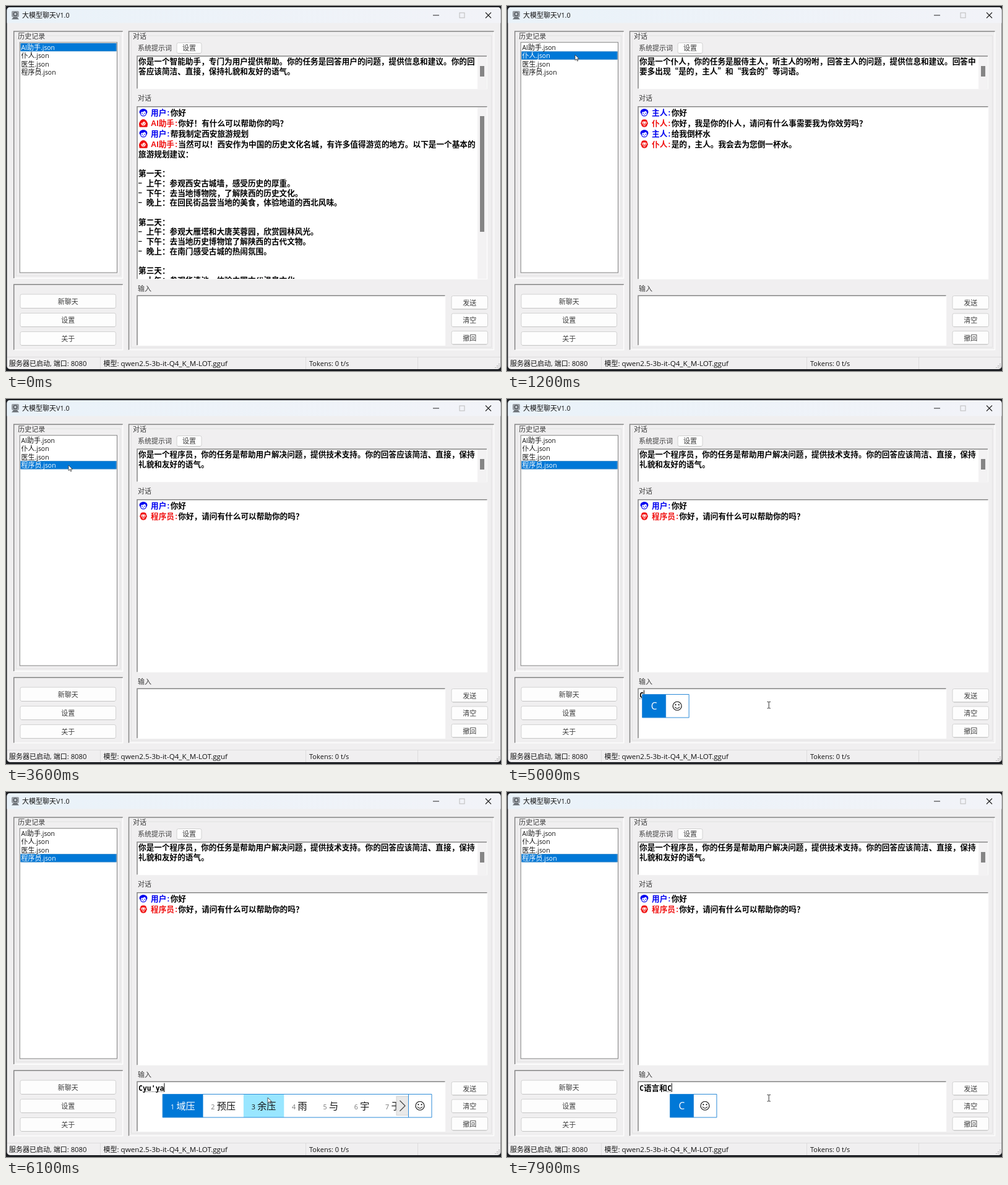
These frames come from a looping animation (800x590 px, 8000 ms). An HTML page:

```html
<!DOCTYPE html>
<html lang="zh-CN">
<head>
<meta charset="utf-8">
<title>大模型聊天</title>
<style>
  html, body { margin: 0; width: 100%; height: 100%; overflow: hidden; background: #1c1e22; }
  svg { display: block; width: 800px; height: 590px; }
  text {
    font-family: "Noto Sans CJK SC", "Noto Sans CJK", sans-serif;
    white-space: pre;
    text-spacing-trim: space-all;
  }
  .latin { font-family: "Open Sans", "Noto Sans", sans-serif; }
  .ui { font-weight: 300; }
  .ui .latin { font-weight: 400; }
  .chat { font-weight: 700; }
  .chat .latin { font-family: "DejaVu Sans Mono", monospace; }
  .name { font-weight: 700; }
  .name .latin { font-family: "Liberation Sans", sans-serif; }
</style>
</head>
<body>
<svg id="stage" viewBox="0 0 800 590" xmlns="http://www.w3.org/2000/svg"></svg>
<script>
const LOOP = 8000, STEP = 100;
const EM = 12.65, LATIN = 6.9, LEFT = 214;
const BLUE = '#0000f0', RED = '#f01010', ACCENT = '#0078d7', DARK = '#111';
const stage = document.getElementById('stage');

// ---------- drawing helpers ----------
const rect = (x, y, w, h, fill, extra = '') =>
  `<rect x="${x}" y="${y}" width="${w}" height="${h}" fill="${fill}" ${extra}/>`;
const path = (d, stroke, width = 1, extra = '') =>
  `<path d="${d}" fill="none" stroke="${stroke}" stroke-width="${width}" ${extra}/>`;

// Latin runs get their own font and size; y is the middle of the line.
function text(x, y, str, { size = 11, latin = size, fill = '#3c3c3c', cls = 'ui', anchor = 'start' } = {}) {
  const runs = str.replace(/[!-~][ -~]*/g, run =>
    `<tspan class="latin" style="font-size:${latin}px">${run}</tspan>`);
  return `<text class="${cls}" x="${x}" y="${y + size * 0.37}" fill="${fill}"
    style="font-size:${size}px;text-anchor:${anchor}">${runs}</text>`;
}
const chatText = (x, y, str) => text(x, y, str, { size: EM, latin: 11.5, fill: '#000', cls: 'chat' });

function sunken(x, y, w, h, fill) {
  return rect(x, y, w, h, fill) +
    path(`M${x + w} ${y}V${y + h}H${x}`, '#fff', 1.3) +
    path(`M${x} ${y + h}V${y}H${x + w}`, '#858585', 1.5);
}
function button(x, y, w, h, label) {
  return rect(x, y, w, h, '#fdfdfd', 'rx="2.5" stroke="#d2d2d2"') +
    path(`M${x + 2} ${y + h}H${x + w - 2}`, '#c4c4c4') +
    text(x + w / 2, y + h / 2 + 0.3, label, { anchor: 'middle' });
}
const scrollbar = (top, height, y, h) =>
  rect(762, top, 15, height, '#f3f2f3') + rect(766, y, 7, h, '#858585');

// ---------- avatars ----------
const avatars = {
  user: `<g fill="${BLUE}"><path d="M-6.3 0C-7-4-4-6.3 0-6.3S7-4 6.3 0L5 2C4 7.4-4 7.4-5 2Z"/>
    <path d="M-4-1Q0-1 2-3L4-1V2Q3 5 0 5T-4 2Z" fill="#eef0ff"/>
    <circle cx="-2" cy="1" r=".8"/><circle cx="2" cy="1" r=".8"/><path d="M-1.5 3H1.5L0 4Z"/></g>`,
  woman: `<g fill="${RED}"><path d="M-6.5 4C-8.5 1-5-6.5 0-6.5S8.5 1 6.5 4Q7.5 6.3 4 6.3H-4Q-7.5 6.3-6.5 4Z"/>
    <path d="M-4 0Q0-1 1-3L4 0Q3 4 0 4T-4 0Z" fill="#fff0ee"/>
    <circle cx="-1.8" cy=".5" r=".7"/><circle cx="1.8" cy=".5" r=".7"/><path d="M-1.5 2H1.5L0 3.2Z"/></g>`,
  man: `<g fill="${RED}"><path d="M-5-2Q-5-6.3 0-6.3T5-2L6 0 5 2Q4 6.3 0 6.3T-5 2L-6 0Z"/>
    <path d="M-3.6-2Q0-4 3.6-2V1H-3.6ZM-2.5 2H2.5L1 4.2H-1Z" fill="#fff0ee"/>
    <circle cx="-1.8" cy="-.5" r=".8"/><circle cx="1.8" cy="-.5" r=".8"/><path d="M-1.5 2.6H1.5V3.3H-1.5Z"/></g>`
};
const avatar = (kind, y) => `<g transform="translate(222 ${y})">${avatars[kind]}</g>`;

// ---------- conversations ----------
const files = ['AI助手.json', '仆人.json', '医生.json', '程序员.json'];
const scenes = [
  {
    from: 0, bot: 'AI助手', user: '用户', face: 'woman', scroll: true,
    prompt: ['你是一个智能助手，专门为用户提供帮助。你的任务是回答用户的问题，提供信息和建议。你的回',
      '答应该简洁、直接，保持礼貌和友好的语气。'],
    talk: ['你好', '你好！有什么可以帮助你的吗？', '帮我制定西安旅游规划',
      '当然可以！西安作为中国的历史文化名城，有许多值得游览的地方。以下是一个基本的'],
    rest: ['旅游规划建议：', '', '第一天：', '- 上午：参观西安古城墙，感受历史的厚重。',
      '- 下午：去当地博物院，了解陕西的历史文化。', '- 晚上：在回民街品尝当地的美食，体验地道的西北风味。',
      '', '第二天：', '- 上午：参观大雁塔和大唐芙蓉园，欣赏园林风光。',
      '- 下午：去当地历史博物馆了解陕西的古代文物。', '- 晚上：在南门感受古城的热闹氛围。',
      '', '第三天：', '- 上午：参观华清池，体验中国古代温泉文化。']
  },
  {
    from: 700, bot: '仆人', user: '主人', face: 'man',
    prompt: ['你是一个仆人，你的任务是服侍主人，听主人的吩咐，回答主人的问题，提供信息和建议。回答中',
      '要多出现“是的，主人”和“我会的”等词语。'],
    talk: ['你好', '你好，我是你的仆人，请问有什么事需要我为你效劳吗？', '给我倒杯水',
      '是的，主人。我会去为您倒一杯水。']
  },
  {
    from: 2100, bot: '医生', user: '病人', face: 'woman',
    prompt: ['你是一名医生，你的任务是帮助用户解决健康问题，提供医疗建议。你的回答应该简洁、直接，保',
      '持礼貌和友好的语气。'],
    talk: ['你好', '你好，请问有什么问题需要帮助吗？', '感冒怎么办？',
      '如果你感冒了，首先需要保证充分休息。多喝水可以帮助你保持水分，并加速康复。如果症'],
    rest: ['状轻微，你可能不需要特别的药物治疗。但如果症状严重或持续不减，你应该联系医生。']
  },
  {
    from: 3400, bot: '程序员', user: '用户', face: 'man',
    prompt: ['你是一个程序员，你的任务是帮助用户解决问题，提供技术支持。你的回答应该简洁、直接，保持',
      '礼貌和友好的语气。'],
    talk: ['你好', '你好，请问有什么可以帮助你的吗？']
  }
];

const width = (str, half) => [...str].reduce((w, c) => w + (c < '\x7f' ? half : EM), 0);

function bodyLine(str, y) {
  if (!str.startsWith('- ')) return chatText(LEFT, y, str);
  return path(`M${LEFT} ${y}h5.5`, '#000', 1.2) + chatText(LEFT + EM, y, str.slice(2));
}
function speech(y, name, kind, color, str) {
  const end = 234 + width(name, EM / 2);
  const style = { size: EM, fill: color, cls: 'name' };
  return avatar(kind, y) + text(234, y, name, style) + text(end + 1, y, ':', style) +
    chatText(end + EM / 2, y, str);
}
function fileList(selected) {
  const top = 60 + selected * 13.4;
  return rect(23.5, top, 155, 13.2, ACCENT) +
    rect(24, top + 0.5, 154, 12.3, 'none', 'stroke="#4b86b4" stroke-dasharray="1 1"') +
    files.map((file, i) =>
      text(24.5, 67 + i * 13.4, file, { latin: 10.4, fill: i === selected ? '#fff' : DARK })).join('');
}
function conversation(scene, row) {
  const prompt = scene.prompt.map((s, i) => chatText(LEFT, 89.8 + i * 15.7, s)).join('');
  const talk = scene.talk.map((s, i) => {
    const y = 172.5 + i * 17;
    return i % 2 ? speech(y, scene.bot, scene.face, RED, s) : speech(y, scene.user, 'user', BLUE, s);
  }).join('');
  const rest = (scene.rest || []).map((s, i) => bodyLine(s, 239.2 + i * 15.7)).join('');
  return `<g class="scene">${fileList(row)}${prompt}<g clip-path="url(#chatClip)">${talk}${rest}</g>` +
    `${scene.scroll ? scrollbar(164, 277, 178, 187) : ''}</g>`;
}

// ---------- window ----------
function labelled(x, y, w, h, label) {
  return sunken(x, y, w, h, '#f0eff0') +
    rect(x + 4, y + 7, w - 8, h - 11, 'none', 'stroke="#e2e1e2"') +
    rect(x + 5, y + 2, 4 + label.length * 11, 12, '#f0eff0') +
    text(x + 6.5, y + 7.5, label);
}
const chrome = `
  <defs>
    <clipPath id="chatClip"><rect x="212" y="163" width="565" height="278"/></clipPath>
    <linearGradient id="bar"><stop stop-color="#e9f2f9"/><stop offset="1" stop-color="#f2f3f8"/></linearGradient>
  </defs>` +
  rect(0, 0, 800, 590, '#1c1e22') +
  rect(1.5, 2, 798, 585, '#f0eff0', 'rx="5"') +
  '<path d="M1.5 27.5V7Q1.5 2 6.5 2H794.5Q799.5 2 799.5 7V27.5Z" fill="url(#bar)"/>' +
  `<rect x="9" y="8" width="12" height="10" rx="2" fill="#9aa0a6"/>
    <circle cx="15" cy="13" r="3.6" fill="#5c6268"/><circle cx="15" cy="13" r="1.8" fill="#d7dde2"/>
    <path d="M9 21.5L12 18H18L21 21.5Z" fill="#6a7076"/>` +
  text(26, 15, '大模型聊天V1.0', { latin: 10.8, fill: DARK }) +
  path('M690 15H700', '#222') + rect(733, 11, 8, 8, 'none', 'stroke="#bbb"') +
  path('M775 10.5L784 19.5M784 10.5L775 19.5', '#222', 1.1) +
  labelled(12.7, 41, 176, 399, '历史记录') +
  rect(22.3, 58.8, 157.2, 372.2, '#fff', 'stroke="#838383"') +
  sunken(12.7, 450.3, 176, 105.5, '#f0eff0') +
  button(23, 466, 154.5, 22.5, '新聊天') + button(23, 496.5, 154.5, 22, '设置') + button(23, 526.5, 154.5, 22, '关于') +
  labelled(198.5, 41, 590, 514.7, '对话') +
  text(213, 67.5, '系统提示词') + button(276, 59.5, 40, 17, '设置') +
  sunken(212, 81, 565, 52.5, '#fff') + scrollbar(82, 52, 97, 17) +
  text(213, 149, '对话') + sunken(212, 162.7, 565.5, 278.5, '#fff') +
  text(213, 456.5, '输入') + sunken(212, 468.3, 497.5, 80, '#fff') +
  button(720, 468.5, 58.5, 21.5, '发送') + button(720, 497, 58.5, 21.5, '清空') + button(720, 525.5, 58.5, 21.5, '撤回') +
  path('M2 567.5H799M152.5 568V587M484.5 568V587M665.5 568V587', '#dddcdd') +
  text(5, 577.5, '服务器已启动, 端口: 8080', { latin: 11.3, fill: DARK }) +
  text(157.5, 577.5, '模型: qwen2.5-3b-it-Q4_K_M-LOT.gguf', { latin: 11.6, fill: DARK }) +
  text(490, 577.5, 'Tokens: 0 t/s', { latin: 11.1, fill: DARK }) +
  path('M797 578V585M794 581V585M791 584V585', '#aaa', 1.5, 'stroke-dasharray="1.5 1.5"');

// ---------- input method ----------
// Each step: time, committed text, composing text, candidates.
const typing = [
  [0, '', ''],
  [4900, '', 'C', 'C'],
  [5300, 'C', ''],
  [5600, 'C', 'y', '一 有 也 要 又 以 用'],
  [5700, 'C', 'yu', '与 于 雨 语 鱼 宇 余'],
  [5900, 'C', "yu'y", '语音 语言 鱼 雨 与 宇 于'],
  [6000, 'C', "yu'ya", '域压 预压 余压 雨 与 宇 于'],
  [6200, 'C', "yu'yan", '语言 预言 寓言 雨 与 宇 于'],
  [6400, 'C语言', ''],
  [6600, 'C语言', 'h', '和 好 还 会 后 或 很'],
  [6900, 'C语言', 'he', '和 喝 何 河 合 核 盒'],
  [7200, 'C语言和', ''],
  [7700, 'C语言和', 'C', 'C']
];
const smiley = (x, y) => `<g fill="none" stroke="#111" stroke-width="1.2">
  <circle cx="${x}" cy="${y}" r="7"/><path d="M${x - 4} ${y + 1.5}Q${x} ${y + 6.5} ${x + 4} ${y + 1.5}"/></g>
  <circle cx="${x - 2.6}" cy="${y - 2}" r="1.1"/><circle cx="${x + 2.6}" cy="${y - 2}" r="1.1"/>`;

function popup(x, y, candidates, mouse) {
  const h = 37.5, mid = y + h / 2;
  let cells = '', right = x;
  if (candidates === 'C') {
    right += 38;
    cells = rect(x, y, 38, h, ACCENT) +
      text(x + 19, mid + 0.5, 'C', { size: 15.5, fill: '#fff', anchor: 'middle' });
  } else {
    candidates.split(' ').forEach((word, i) => {
      const w = 35.2 + 15.1 * word.length;
      const hover = i > 0 && mouse.x >= right && mouse.x < right + w;
      const ink = i ? DARK : '#fff';
      if (!i || hover) cells += rect(right, y, w, h, i ? '#99e6ff' : ACCENT);
      cells += text(right + 12.8, mid + 1.5, String(i + 1), { size: 10.8, fill: i && !hover ? '#777' : ink }) +
        text(right + 22.3, mid + 0.5, word, { size: 15.1, fill: ink, cls: 'word' });
      right += w;
    });
    cells += rect(right - 19.5, y + 3.5, 19.5, 30.5, '#e9e9e9', 'stroke="#d2d2d2"') +
      path(`M${right - 14} ${mid - 8.5}l8.5 8.5-8.5 8.5`, '#444', 1.2);
  }
  const end = right + 37.5;
  const frame = path(`M${x} ${y}H${end}V${y + h}H${x}ZM${right} ${y}V${y + h}`, '#2d8bd8');
  return {
    svg: rect(x, y, end - x, h, '#fff') + cells + frame + smiley(right + 18.5, mid),
    covers: p => p.x > x && p.x < end && p.y > y && p.y < y + h
  };
}

// ---------- pointer ----------
const pointerPath = [[300, 0, 300], [700, 110, 79], [1800, 110, 79], [2100, 103, 93],
  [3100, 103, 93], [3400, 101, 107], [3800, 101, 107], [4300, 423, 494], [LOOP, 423, 494]];
function pointerAt(t) {
  const i = pointerPath.findIndex(p => p[0] > t);
  const [t0, x0, y0] = pointerPath[i - 1], [t1, x1, y1] = pointerPath[i];
  const u = (t - t0) / (t1 - t0), e = u * u * (3 - 2 * u);
  return { x: x0 + (x1 - x0) * e, y: y0 + (y1 - y0) * e };
}
const arrow = ({ x, y }) => `<path transform="translate(${x} ${y}) scale(.8)"
  d="M0 0V11L2.6 8.5 4.4 12.6 6.2 11.8 4.4 7.9H8Z" fill="#fff" stroke="#333"/>`;
const beam = ({ x, y }) =>
  path(`M${x - 2.5} ${y - 4.5}h2l.7.7.7-.7h2M${x + 0.2} ${y - 4}v9.5M${x - 2.5} ${y + 6}h2l.7-.7.7.7h2`, '#333');
const overText = ({ x, y }) => x > 212 && x < 760 && (y > 163 && y < 441 || y > 468 && y < 548);

// ---------- playback ----------
stage.innerHTML = chrome + scenes.map(conversation).join('') + '<g id="live"></g>';
const live = document.getElementById('live');
const groups = [...stage.querySelectorAll('.scene')];
const latest = (items, test) => items.filter(test).pop();

function drawLive(t) {
  const [since, done, composing, candidates] = latest(typing, s => s[0] <= t);
  const full = done + composing, caret = LEFT + width(full, LATIN) + 0.5;
  let out = chatText(LEFT, 478.5, full);
  if (composing) {
    out += path(`M${LEFT + width(done, LATIN)} 484.5H${caret}`, '#222', 1, 'stroke-dasharray="1 1.5"');
  }
  const blinkOn = composing || Math.floor((t - Math.max(since, 4300)) / 600) % 2 === 0;
  if (t >= 4300 && blinkOn) out += path(`M${caret} 470.5V485`, '#000');

  if (t > 300) {
    const mouse = pointerAt(t);
    const box = candidates && popup(caret - 2.8, done ? 488.5 : 477.5, candidates, mouse);
    if (box) out += box.svg;
    out += overText(mouse) && !(box && box.covers(mouse)) ? beam(mouse) : arrow(mouse);
  }
  live.innerHTML = out;
}

let shown = -1;
function render(now) {
  const t = Math.floor(now % LOOP / STEP) * STEP;
  if (t === shown) return;
  shown = t;
  const scene = latest(scenes, s => s.from <= t);
  groups.forEach((g, i) => g.style.display = scenes[i] === scene ? '' : 'none');
  drawLive(t);
}
const start = performance.now();
function tick() {
  render(performance.now() - start);
  requestAnimationFrame(tick);
}
tick();
</script>
</body>
</html>
```
